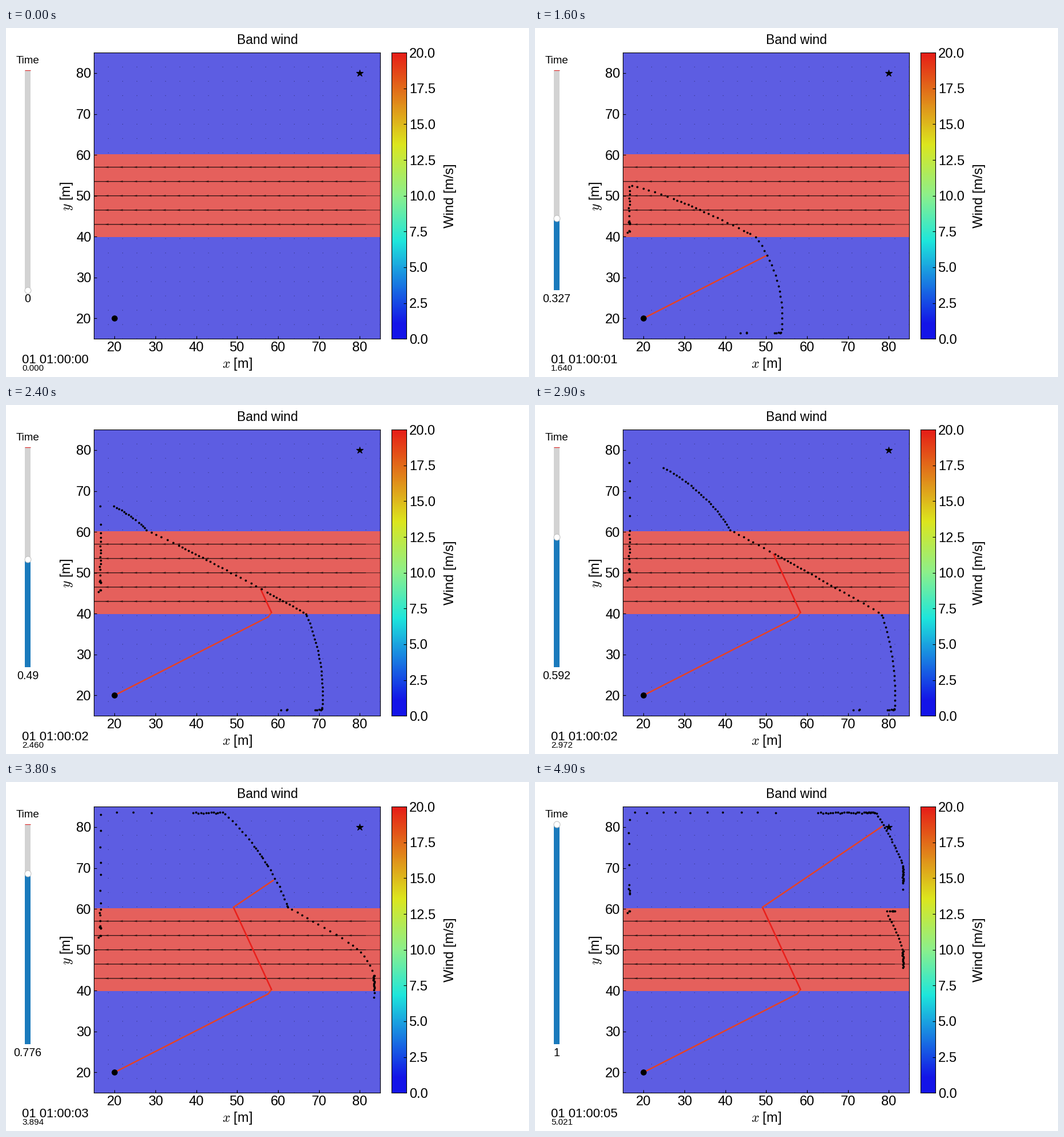
A matplotlib script that plays this animation: 917 by 611 pixels, repeating every 5000 ms.

```python
import numpy as np
import matplotlib.pyplot as plt
from matplotlib.animation import FuncAnimation
from matplotlib.collections import LineCollection
from matplotlib.colors import LinearSegmentedColormap
from matplotlib.patches import Rectangle

WIDTH, HEIGHT, DPI = 917, 611, 100
FRAMES, INTERVAL = 50, 100
DURATION = 5.0215             # simulated seconds
AIRSPEED, WIND = 20.7, 20.0   # m/s
SLOW = np.sqrt(AIRSPEED**2 - WIND**2)
BAND = (40, 60.4)             # the wind fades out slightly above the band
LOW, HIGH = 16.5, 83.5        # limits where rays start sliding
MAX_GAP, MIN_GAP = 1.68, 1.2  # a new ray fills a wide gap and hides in a narrow one
TIMES = np.linspace(0, DURATION, FRAMES)

plt.rcParams.update({"font.family": "Liberation Sans", "mathtext.fontset": "cm"})


def pt(pixels):
    return pixels * 72 / DPI


def simulate(phi, rng, substeps=20):
    """Extremal rays from (20, 20): refracted by the band, sliding on the limits."""
    c, s = np.cos(phi), np.sin(phi)
    c_band = np.clip(c / (1 + WIND / AIRSPEED * c), -1, 1)
    s_band = np.sqrt(1 - c_band**2)
    x, y = np.full((2, phi.size), 20.0)
    side = np.zeros(phi.size, int)      # 0 free, 1 vertical limit, 2 horizontal limit
    jitter = rng.uniform(-0.15, 0.15, phi.size)
    jitter[phi > np.radians(230)] = -0.45
    dt = DURATION / (FRAMES - 1) / substeps
    pos, free = [], []
    for _ in range(FRAMES):
        pos.append(np.stack([x, y], axis=1))
        free.append(side == 0)
        for _ in range(substeps):
            in_band = (y > BAND[0]) & (y < BAND[1])
            vx = np.where(in_band, AIRSPEED * c_band - WIND, AIRSPEED * c)
            vy = AIRSPEED * np.where(in_band, s_band, s)
            climb = np.where(in_band, SLOW, AIRSPEED)
            x = x + dt * np.choose(side, [vx, 0 * x, AIRSPEED + 0 * x])
            y = y + dt * np.choose(side, [vy, climb, 0 * y])

            gone = (x > HIGH) & ((phi < np.radians(1)) | (side == 2))
            x[gone] = np.nan
            vertical = (side == 0) & ((x < LOW) | (x > HIGH)) & ((phi > 0) | (x > HIGH))
            x = np.where(vertical, np.where(x < 50, LOW, HIGH) + jitter, x)
            side[vertical] = 1
            bottom = (side == 0) & (phi < 0) & (y < LOW)
            top = (side != 2) & (y > HIGH)
            y = np.where(bottom, LOW + jitter, np.where(top, HIGH + jitter, y))
            side[bottom | top] = 2
    return np.array(pos), np.array(free)


def corner_fan(psi, start=3.24, ride_speed=11):
    """Rays from the right end of the band's lower edge; shallow ones ride the upper edge."""
    tau = np.maximum(TIMES - start, 0)[:, None]
    vx, vy = AIRSPEED * np.cos(psi) - WIND, AIRSPEED * np.sin(psi)
    after = np.maximum(tau - 19.4 / vy, 0)
    c_out = np.cos(psi) / (1 - WIND / AIRSPEED * np.cos(psi))
    leaves = (c_out > 0) & (c_out < 1)
    c_out = np.where(leaves, c_out, 1)
    x = HIGH + vx * (tau - after) + np.where(leaves, AIRSPEED * c_out, ride_speed) * after
    y = BAND[0] + vy * (tau - after) + AIRSPEED * np.sqrt(1 - c_out**2) * after
    overshoot = np.maximum(x - HIGH, 0)
    pos = np.stack([x - overshoot, y + overshoot], axis=2)
    pos[TIMES < start] = np.nan
    return pos


def reveal(pos, free, stride):
    """Show every stride-th ray, and halve the spacing where gaps grow too wide."""
    shown = np.zeros(free.shape, bool)
    shown[:, ::stride] = True
    while stride > 1:
        a = np.arange(0, free.shape[1] - 1, stride)
        b = a + stride
        gap = np.hypot(*(pos[:, b] - pos[:, a]).T).T
        both_free = free[:, a] & free[:, b]
        wide = (gap > MAX_GAP) & both_free & shown[:, a] & shown[:, b]
        crowded = both_free & (gap < MIN_GAP)
        shown[:, a + stride // 2] = np.logical_or.accumulate(wide, axis=0) & ~crowded
        stride //= 2
    return shown


def build_fronts():
    rng = np.random.default_rng(4)
    phi = np.radians(np.linspace(-9, 99, 385))
    downward = np.array([-13.5, -27, -45, -56, -135.5, -136, -141.6])
    edge_phi = np.radians(np.concatenate([downward, 90 - downward]))
    rays, free = simulate(phi, rng)
    edge_rays, _ = simulate(edge_phi, rng)
    fan = corner_fan(np.radians(np.linspace(16, 60.2, 65)))
    shown = reveal(rays, free, 16)
    fan_shown = reveal(fan, np.ones(fan.shape[:2], bool), 64)
    return [np.concatenate([rays[i][shown[i]], edge_rays[i], fan[i][fan_shown[i]]])
            for i in range(FRAMES)]


fronts = build_fronts()

fig = plt.figure(figsize=(WIDTH / DPI, HEIGHT / DPI), dpi=DPI, facecolor="white")


def pixel_axes(left, top, right, bottom):
    return fig.add_axes([left / WIDTH, 1 - bottom / HEIGHT,
                         (right - left) / WIDTH, (bottom - top) / HEIGHT])


def label(x, y, text, size, **kwargs):
    return fig.text(x / WIDTH, 1 - y / HEIGHT, text, fontsize=pt(size), **kwargs)


# Wind field
ax = pixel_axes(154.3, 43.2, 656.1, 544.2)
ax.set(xlim=(15, 85), ylim=(15, 85), xticks=range(20, 81, 10), yticks=range(20, 81, 10))
ax.set_facecolor("#5d5de2")
ax.axhspan(39.85, 60.15, color="#e5605c", lw=0, zorder=0.5)
ax.tick_params(direction="in", labelsize=pt(23.8), pad=3.5)
grid_x, grid_y = np.meshgrid(np.linspace(15, 85, 21), np.linspace(15, 85, 21))
wind_u = np.where(abs(grid_y - 50) < 10, -WIND, 0)
ax.quiver(grid_x, grid_y, wind_u, 0 * wind_u, units="dots", scale_units="dots",
          width=1.3, scale=WIND / 56, color="black", alpha=0.5, zorder=1)
ax.plot(20, 20, "o", color="black", ms=pt(10.6), mew=0, zorder=5)
ax.plot(80, 80, "*", color="black", ms=pt(12.5), mew=0.8, zorder=5)

# Colour bar
wind_cmap = LinearSegmentedColormap.from_list("wind", [
    (0, "#1414e8"), (0.05, "#1414e8"), (0.34, "#1ee6dc"), (0.5, "#8cf08c"),
    (0.68, "#dce61e"), (1, "#e61e17")])
bar = pixel_axes(676.3, 43.2, 702, 544.2)
bar.imshow(np.linspace(0, 1, 256)[:, None], cmap=wind_cmap, origin="lower",
           aspect="auto", extent=(0, 1, 0, 20))
bar.set(xticks=[], yticks=np.arange(0, 20.1, 2.5))
bar.yaxis.tick_right()
bar.yaxis.set_major_formatter("{x:.1f}")
bar.tick_params(direction="in", labelsize=pt(23.8), pad=3.5)

label(458.5, 28.5, "Band wind", 22.9, ha="center")
label(405, 594.5, "$x$ [m]", 23.5, ha="center")
label(106, 294, "$y$ [m]", 23.5, ha="center", va="center", rotation=90)
label(779, 294, "Wind [m/s]", 23.9, ha="center", va="center", rotation=90)
label(38, 62, "Time", 18.9, ha="center")
value_text = label(38, 480, "", 19.6, ha="center")
clock_text = label(28, 587, "", 22.2)
seconds_text = label(28, 600.5, "", 15.2)

# Time slider, drawn in pixels
TRACK_TOP, TRACK_BOTTOM = 73.5, 458.5
stage = pixel_axes(0, 0, WIDTH, HEIGHT)
stage.set(xlim=(0, WIDTH), ylim=(HEIGHT, 0))
stage.axis("off")
stage.add_patch(Rectangle((33, TRACK_TOP), 10, TRACK_BOTTOM - TRACK_TOP, fc="#d3d3d3", lw=0))
fill = stage.add_patch(Rectangle((33, TRACK_BOTTOM), 10, 0, fc="#1a7abc", lw=0))
stage.plot([33, 43], [TRACK_TOP, TRACK_TOP], color="#e03030", lw=pt(1.2), solid_capstyle="butt")
handle, = stage.plot([38], [TRACK_BOTTOM], "o", ms=pt(11), mfc="white", mec="#bfbfbf", mew=pt(1))

# Fastest route and moving front
ROUTE = np.array([(20, 20), (57.6, 39.2), (58.4, 40.3), (49.1, 60.4), (78.4, 80.2)])
ROUTE_TIMES = np.array([0, 2.05, 2.11, 3.33, DURATION])
CALM_RED, BAND_RED = "#e2432a", "#e9201c"
route = LineCollection([], colors=[CALM_RED, CALM_RED, BAND_RED, CALM_RED],
                       linewidths=pt(2.6), capstyle="round", zorder=3)
ax.add_collection(route, autolim=False)
front, = ax.plot([], [], "o", color="black", ms=pt(3.8), mew=0, zorder=4)


def update(i):
    t, progress = TIMES[i], i / (FRAMES - 1)
    head = [np.interp(t, ROUTE_TIMES, axis) for axis in ROUTE.T]
    points = np.vstack([ROUTE[ROUTE_TIMES < t], head])
    route.set_segments([points[k:k + 2] for k in range(len(points) - 1)])
    front.set_data(*fronts[i].T)

    level = TRACK_BOTTOM - progress * (TRACK_BOTTOM - TRACK_TOP)
    fill.set_y(level)
    fill.set_height(TRACK_BOTTOM - level)
    handle.set_ydata([level])
    value_text.set_text(f"{round(progress, 3):g}")
    clock_text.set_text(f"01 01:00:{int(t):02d}")
    seconds_text.set_text(f"{t:.3f}")
    return route, front, fill, handle, value_text, clock_text, seconds_text


animation = FuncAnimation(fig, update, frames=FRAMES, interval=INTERVAL,
                          repeat=True, repeat_delay=0)
plt.show()
```
